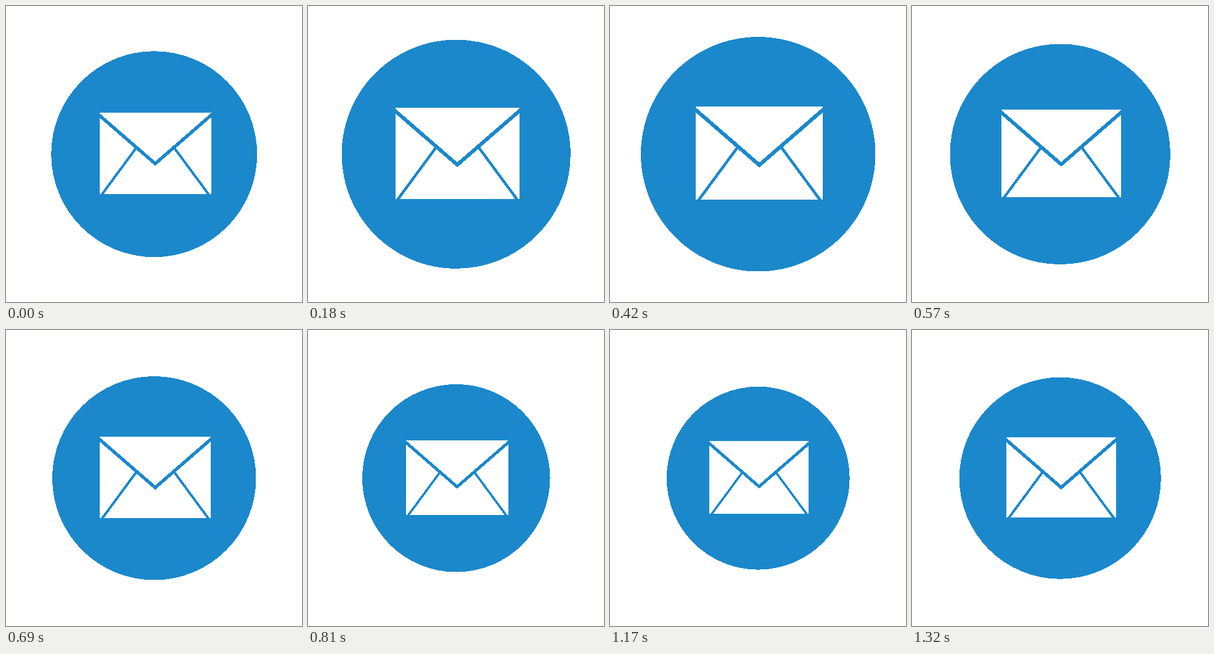
These frames come from a looping animation (480x480 px, 1.35 s). An HTML page:

```html
<!DOCTYPE html>
<html lang="en">
<head>
<meta charset="utf-8">
<title>Pulsing mail icon</title>
<style>
  html, body { margin: 0; width: 100%; height: 100%; overflow: hidden; background: #fff; }
  svg { display: block; width: 100vw; height: 100vh; }
</style>
</head>
<body>
<svg viewBox="0 0 480 480" shape-rendering="crispEdges">
  <g id="icon" fill="none" stroke="#1b88cb">
    <circle cx="-.25" cy=".25" r="167" fill="#1b88cb" stroke="none"/>
    <path d="M-88.97-67.3H92.15V65.3H-88.97Z" fill="#fff" stroke="none"/>
    <path d="M-92.5-65.7L1.4 15.7L95.3-65.7" stroke-width="5.4"/>
    <path d="M-29.2-10L-86 67M32.4-10L89.2 67" stroke-width="4"/>
  </g>
</svg>
<script>
  const LOOP = 1350, STEP = 30, SWING = 25 / 167;
  const icon = document.getElementById('icon');

  function draw() {
    const time = Math.floor(performance.now() % LOOP / STEP) * STEP;
    const scale = 1 + SWING * Math.sin(2 * Math.PI * time / LOOP);
    icon.setAttribute('transform', `translate(240.5 240) scale(${scale})`);
    requestAnimationFrame(draw);
  }
  draw();
</script>
</body>
</html>
```
